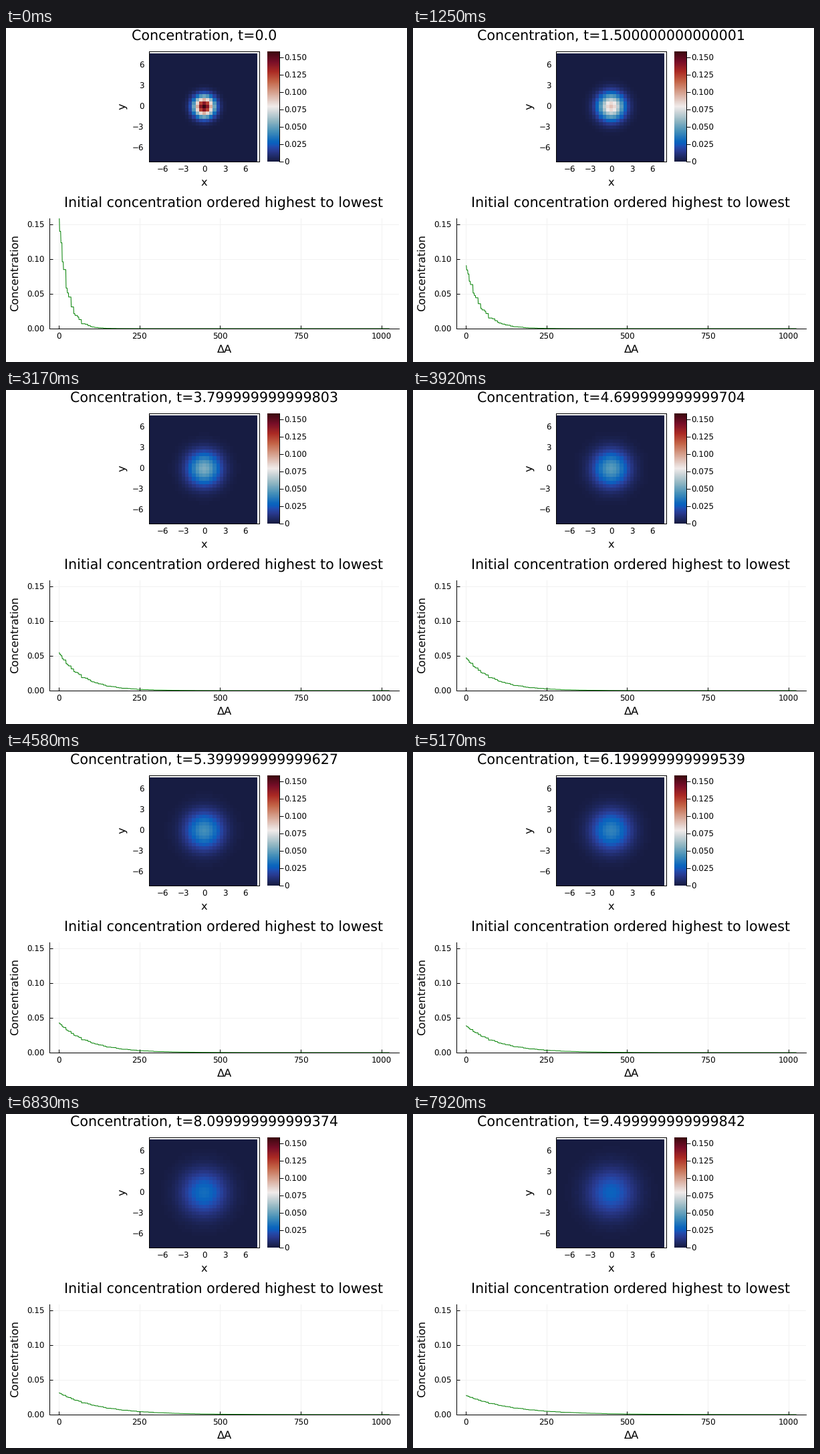
Write a matplotlib script that moves like this. It is 600x500 px and loops after 8 s.

```python
import numpy as np
import matplotlib.pyplot as plt
from matplotlib.animation import FuncAnimation
from matplotlib.colors import LinearSegmentedColormap

W, H, DPI = 600, 500, 100
FRAMES, LOOP_MS = 96, 8000
DT, SUBSTEPS = 0.002, 50
DIFFUSIVITY = 0.25
PEAK = 1 / (2 * np.pi)
PT = 72 / DPI
TICK, LABEL, TITLE = 11.83, 16.26, 20.7  # font sizes in pixels

plt.rcParams.update({"font.family": "DejaVu Sans", "text.hinting": "none"})

STOPS = [
    (0, (23, 28, 66)), (1 / 11, (41, 58, 143)), (0.136, (33, 78, 178)),
    (0.16, (12, 94, 190)), (2 / 11, (11, 102, 189)), (3 / 11, (69, 144, 185)),
    (4 / 11, (142, 181, 194)), (5 / 11, (210, 216, 219)),
    (0.5, (241, 236, 235)), (6 / 11, (230, 210, 204)),
    (7 / 11, (213, 157, 137)), (8 / 11, (196, 101, 72)),
    (9 / 11, (172, 43, 36)), (10 / 11, (120, 14, 40)), (1, (60, 9, 17)),
]
BALANCE = LinearSegmentedColormap.from_list(
    "balance", [(p, np.array(c) / 255) for p, c in STOPS], N=256)

fig = plt.figure(figsize=(W / DPI, H / DPI), dpi=DPI, facecolor="white")


def panel(left, top, right, bottom):
    ax = fig.add_axes([left / W, 1 - bottom / H,
                       (right - left) / W, (bottom - top) / H])
    ax.patch.set_visible(False)
    ax.tick_params(direction="in", length=5 * PT, width=PT,
                   labelbottom=False, labelleft=False)
    for spine in ax.spines.values():
        spine.set_linewidth(PT)
    return ax


def write(x, y, text, size, ha="center", **kw):
    return fig.text(x / W, 1 - y / H, text, fontsize=size * PT, ha=ha,
                    va="baseline", color="black",
                    rotation_mode="anchor", **kw)


def signed(v):
    return str(v).replace("-", "\u2212")


# Times come from repeated addition, so rounding drift shows in the title.
times = [0.0]
for _ in range(FRAMES - 1):
    t = times[-1]
    for _ in range(SUBSTEPS):
        t += DT
    times.append(t)

axis = np.arange(-8, 8, 0.5)
edges = np.arange(-8.25, 8, 0.5)


def concentration(t):
    """Spreading Gaussian on a periodic square of side 16."""
    var = 1 + 2 * DIFFUSIVITY * t
    row = sum(np.exp(-(axis + s) ** 2 / (2 * var)) for s in (-16, 0, 16))
    return np.outer(row, row) / (2 * np.pi * var)


def ordered(c):
    return np.sort(c.ravel())[::-1]


# Heatmap
L, T, R, B = 214, 35, 379, 200
field = panel(L, T, R, B)
heat = field.pcolormesh(edges, edges, concentration(0), cmap=BALANCE,
                        vmin=0, vmax=PEAK, antialiased=False)
field.set(xlim=(-8, 8), ylim=(-8, 8), xticks=[], yticks=[])
for v in (-6, -3, 0, 3, 6):
    write(L + (v + 8) / 16 * (R - L), 216, signed(v), TICK)
    write(206.3, B - (v + 8) / 16 * (B - T) + 4.7, signed(v), TICK, "right")
write(296.5, 236, "x", LABEL)
write(179, 117, "y", LABEL, rotation=90)
title = write(297, 19, "", TITLE)

# Colour bar
bar = panel(391, T, 409, B)
bar.imshow(np.linspace(0, 1, 256)[:, None], cmap=BALANCE, origin="lower",
           extent=(0, 1, 0, PEAK), aspect="auto")
levels = np.arange(7) * 0.025
bar.set(xticks=[], yticks=levels)
bar.yaxis.tick_right()
bar.tick_params(direction="out", length=6 * PT, labelright=False)
bar.spines[["left", "top", "bottom"]].set_visible(False)
for v in levels:
    write(416.7, B - v / PEAK * (B - T) + 4.7,
          f"{v:.3f}" if v else "0", TICK, "left")

# Ordered values
L, T, R, B = 65, 285, 588, 450
rank = np.arange(1, axis.size ** 2 + 1)
pad = 0.03 * (rank[-1] - 1)
lo, hi = 1 - pad, rank[-1] + pad
curve = panel(L, T, R, B)
line, = curve.plot(rank, ordered(concentration(0)), color="green", lw=PT)
xmarks = range(0, 1001, 250)
ymarks = [0, 0.05, 0.1, 0.15]
curve.set(xlim=(lo, hi), ylim=(0, PEAK), xticks=xmarks, yticks=ymarks)
curve.set_axisbelow(True)
curve.grid(color="#f1f1f1", lw=PT)
curve.spines[["top", "right"]].set_visible(False)
for v in xmarks:
    write(L + (v - lo) / (hi - lo) * (R - L), 466, str(v), TICK)
for v in ymarks:
    write(57.3, B - v / PEAK * (B - T) + 4.7, f"{v:.2f}", TICK, "right")
write(326.5, 486, "\u0394A", LABEL)
write(18, 367, "Concentration", LABEL, rotation=90)
write(326, 269, "Initial concentration ordered highest to lowest", TITLE)


def draw(i):
    c = concentration(times[i])
    heat.set_array(c)
    line.set_ydata(ordered(c))
    title.set_text(f"Concentration, t={times[i]}")
    return heat, line, title


anim = FuncAnimation(fig, draw, frames=FRAMES, interval=LOOP_MS / FRAMES,
                     repeat=True, repeat_delay=0, blit=False)
plt.show()
```
